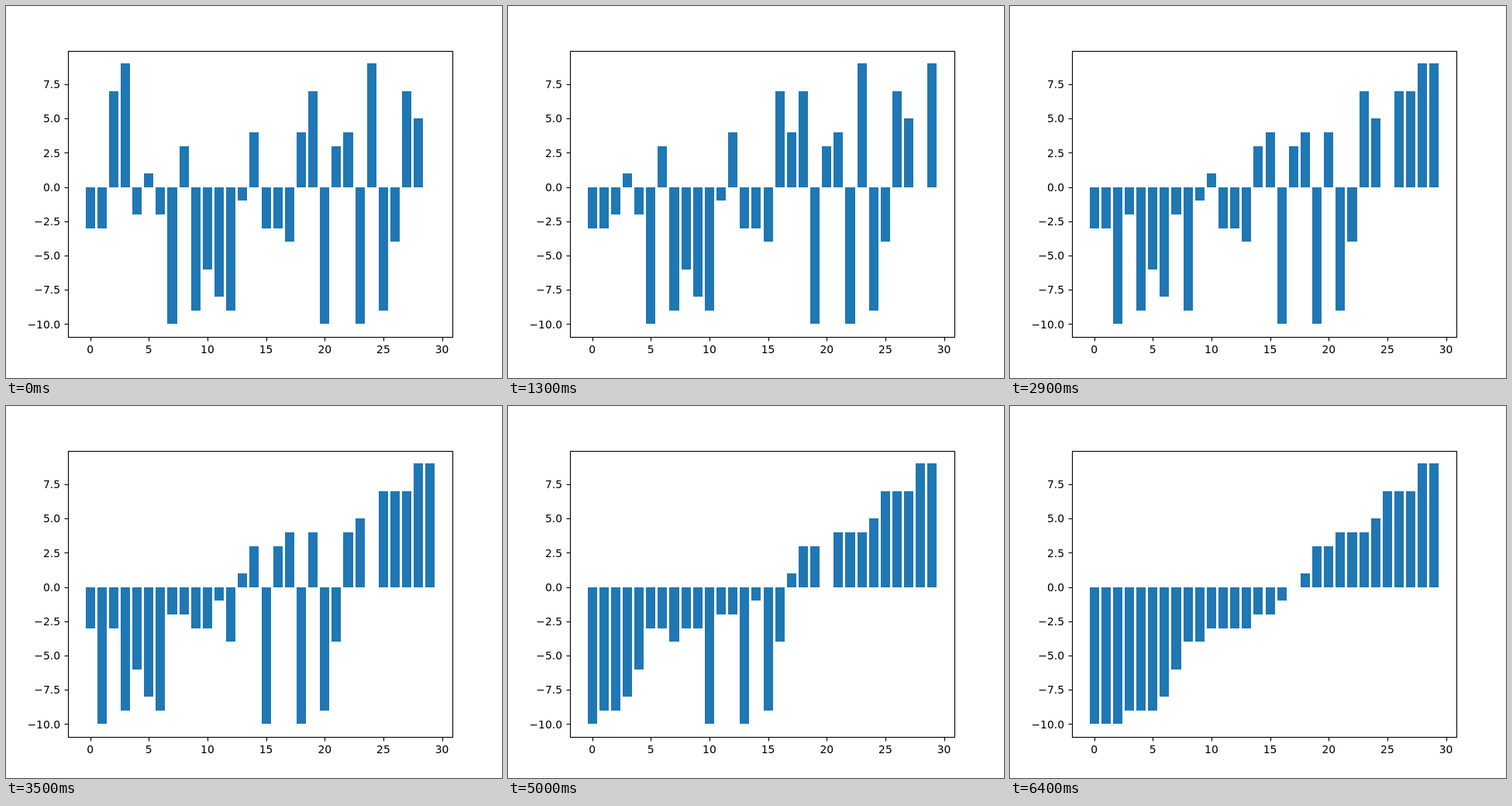
An HTML page with a canvas that plays this animation: 640 by 480 pixels, repeating every 7.1 s.

```html
<!DOCTYPE html>
<html lang="en">
<head>
<meta charset="utf-8">
<title>Bubble sort</title>
<style>
  html, body { margin: 0; width: 100%; height: 100%; overflow: hidden; background: #fff; }
  canvas { display: block; }
</style>
</head>
<body>
<canvas id="chart" width="640" height="480"></canvas>
<script>
const ctx = document.getElementById('chart').getContext('2d');
const start = [-3, -3, 7, 9, -2, 1, -2, -10, 3, -9, -6, -8, -9, -1, 4,
  -3, -3, -4, 4, 7, -10, 3, 4, -10, 9, -9, -4, 7, 5, 0];
const LOOP = 7100, STEP = 100, SWAPS = 3;

// Plot area and data scales, with a 5% margin around the bars
const plot = { x: 80, y: 57.6, w: 496, h: 369.6 };
const xOf = v => plot.x + (v + 1.89) * plot.w / 32.78;
const yOf = v => plot.y + (9.95 - v) * plot.h / 20.9;

// Bubble sort, keeping one state for every three swaps
function sortStates(values) {
  const a = [...values], states = [values];
  let swaps = 0;
  for (let end = a.length - 1; end > 0; end--) {
    for (let j = 0; j < end; j++) {
      if (a[j] <= a[j + 1]) continue;
      [a[j], a[j + 1]] = [a[j + 1], a[j]];
      if (++swaps % SWAPS === 0) states.push([...a]);
    }
  }
  return states;
}

function line(x1, y1, x2, y2) {
  ctx.beginPath();
  ctx.moveTo(x1, y1);
  ctx.lineTo(x2, y2);
  ctx.stroke();
}

function drawAxes() {
  ctx.strokeStyle = ctx.fillStyle = '#000';
  ctx.lineWidth = 1.11;
  ctx.strokeRect(80.5, 58.5, 496, 369);
  ctx.font = '13.89px "DejaVu Sans", sans-serif';

  ctx.textAlign = 'center';
  for (let v = 0; v <= 30; v += 5) {
    const x = Math.round(xOf(v)) + 0.5;
    line(x, 427.5, x, 432.5);
    ctx.fillText(v, xOf(v), 448);
  }

  ctx.textAlign = 'right';
  for (let v = -10; v <= 7.5; v += 2.5) {
    const y = Math.round(yOf(v)) + 0.5;
    line(75.5, y, 80.5, y);
    ctx.fillText(v.toFixed(1).replace('-', '\u2212'), 70, Math.round(yOf(v) + 5.3));
  }
}

function drawBars(values) {
  const zero = Math.round(yOf(0));
  ctx.fillStyle = '#1f77b4';
  values.forEach((v, i) => {
    const x = Math.round(xOf(i - 0.4));
    ctx.fillRect(x, zero, Math.round(xOf(i + 0.4)) - x, Math.round(yOf(v)) - zero);
  });
}

const states = sortStates(start);
const t0 = performance.now();

function draw() {
  const t = (performance.now() - t0) % LOOP;
  ctx.fillStyle = '#fff';
  ctx.fillRect(0, 0, 640, 480);
  drawBars(states[Math.min(Math.floor(t / STEP), states.length - 1)]);
  drawAxes();
  requestAnimationFrame(draw);
}
draw();
</script>
</body>
</html>
```
